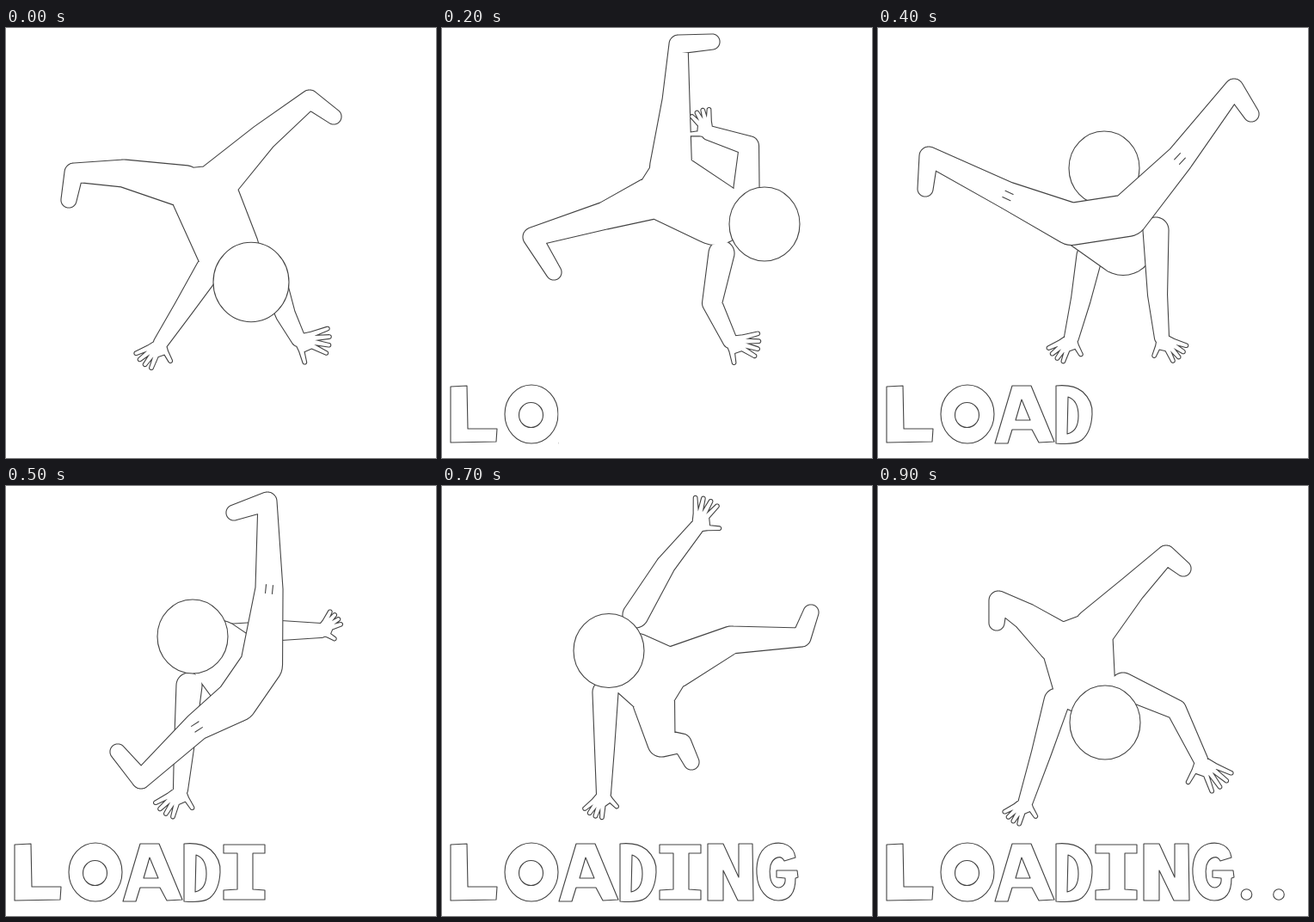
An HTML page that plays this animation: 500 px wide and 500 px high, repeating every 1000 ms.

```html
<!DOCTYPE html>
<html lang="en">
<head>
<meta charset="utf-8">
<title>Loading</title>
<style>
html, body { margin: 0; width: 100%; height: 100%; overflow: hidden; background: #fff; }
svg { display: block; width: 100vw; height: 100vh; }
.ink { fill: none; stroke: #444; stroke-width: 1.1; stroke-linecap: round; stroke-linejoin: round; }
.edge { stroke-width: 2.2; }
.skin { fill: #fff; stroke: none; }
.head { fill: #fff; }
.pose { visibility: hidden; animation: show 1s step-end infinite; animation-delay: calc(var(--i) * 100ms - 1000ms); }
.cover { fill: #fff; animation: reveal 1s step-end infinite; }
@keyframes show { 0% { visibility: visible; } 10%, 100% { visibility: hidden; } }
@keyframes reveal {
  0% { transform: translateX(0); }
  10% { transform: translateX(69px); }
  20% { transform: translateX(135.5px); }
  30% { transform: translateX(205.8px); }
  40% { transform: translateX(251px); }
  50% { transform: translateX(305px); }
  60% { transform: translateX(363.5px); }
  70% { transform: translateX(417px); }
  80% { transform: translateX(446px); }
  90%, 100% { transform: translateX(500px); }
}
</style>
</head>
<body>
<svg viewBox="0 0 500 500">
  <g class="ink">
    <path d="M10 417L29 416L30 466L64 466L63 481L10 482Z"/>
    <ellipse cx="104" cy="449" rx="31" ry="34"/>
    <ellipse cx="103.500" cy="450" rx="14" ry="14.500"/>
    <path d="M136 483L156 416L178 416L205 481L187 482L179 467L156 467L151 483ZM167 432L160 456L177 456Z"/>
    <path d="M207 416Q227 414 238 423Q250 434 249 449Q248 470 237 479Q229 485 207 483ZM221 429L220 472Q233 469 233 451Q233 433 221 429Z"/>
    <path d="M253 417H301V427H287V469L301 470V481H253V470L269 469V427H253Z"/>
    <path d="M309 416H327L345 455V416H361L362 482H344L327 447V482H309Z"/>
    <path d="M411 432C409 418 397 413 384 416C370 420 365 435 366 451C367 470 378 482 391 482C405 482 411 472 411 456L414 455L413 447H389V455L399 456C400 464 394 469 388 466C381 462 380 450 382 441C385 432 394 428 398 436Z"/>
    <circle cx="428.500" cy="475" r="6.300"/>
    <circle cx="466" cy="475" r="6.300"/>
  </g>
  <rect class="cover" y="405" width="500" height="90"/>
  <g id="dancer" class="ink"></g>
</svg>
<script>
// Key poses, one per beat of 100 ms. Legs: hip, knee, heel, toe.
// Arms: shoulder, elbow, wrist, fingertips. Beats left out are in-betweens.
// Layers run back to front; letters in one layer merge into one outline:
// t torso, p pelvis, l and r legs (capital: with knee marks), a and b arms, h head.
const keys = [
  { beat: 0, layers: "tlrab h", head: [285, 295.5, 44], chest: [258, 258],
    l: [[207, 184], [137, 169], [79, 168], [73, 200]],
    r: [[245, 180], [299, 127], [353, 83], [381, 103]],
    a: [[236, 280], [207, 325], [180, 366], [157, 390]],
    b: [[310, 290], [325, 333], [340, 362], [378, 364]] },
  { beat: 2, layers: "tlrab h", head: [375, 228, 41], chest: [318, 216],
    l: [[243, 198], [190, 218], [105, 243], [130, 284]],
    r: [[266, 162], [272, 85], [275, 19], [314, 16]],
    a: [[354, 186], [357, 137], [310, 122], [299, 95]],
    b: [[325, 262], [314, 320], [335, 364], [370, 369]] },
  { beat: 4, layers: "a t b h pLR", head: [263, 163, 41], chest: [285, 251],
    l: [[225, 228], [151, 195], [59, 149], [55, 187]],
    r: [[290, 218], [351, 152], [414, 70], [434, 100]],
    a: [[246, 265], [236, 315], [225, 360], [204, 383]],
    b: [[323, 235], [325, 310], [330, 360], [354, 381]] },
  { beat: 5, layers: "b ta pLR h", head: [217, 175, 41], chest: [245, 192],
    l: [[268, 250], [222, 280], [157, 341], [130, 309]],
    r: [[297, 208], [306, 120], [304, 18], [265, 31]],
    a: [[213, 232], [207, 305], [203, 353], [181, 380]],
    b: [[265, 175], [320, 168], [366, 168], [386, 151]] },
  { beat: 6, layers: "b tlaR h", head: [188, 167, 41], chest: [217, 205],
    l: [[305, 247], [359, 306], [428, 257], [449, 283]],
    r: [[292, 205], [264, 148], [263, 44], [241, 76]],
    a: [[193, 228], [191, 300], [190, 358], [172, 383]],
    b: [[240, 158], [285, 137], [325, 134], [357, 130]] },
  { beat: 7, layers: "tlrab h", head: [194, 191.5, 41], chest: [222, 207],
    l: [[246, 250], [255, 299], [279, 299], [290, 321]],
    r: [[270, 211], [336, 179], [418, 176], [429, 147]],
    a: [[190, 240], [189, 305], [188, 357], [174, 384]],
    b: [[225, 150], [260, 92], [296, 48], [309, 14]] },
  { beat: 9, layers: "tlrab h", head: [264, 275, 41], chest: [239, 228],
    l: [[209, 182], [172, 152], [140, 133], [138, 159]],
    r: [[252, 166], [295, 120], [335, 80], [355, 96]],
    a: [[208, 250], [190, 310], [172, 366], [153, 389]],
    b: [[285, 232], [347, 260], [375, 318], [403, 348]] }
];

const LEG = [24, 15.5, 10.5, 8.5], ARM = [14.5, 11, 8];
const range = n => [...Array(n).keys()];
const mean = (a, b) => a.map((v, i) => (v + b[i]) / 2);
const polar = (p, q) => ({ angle: Math.atan2(q[1] - p[1], q[0] - p[0]), len: Math.hypot(q[0] - p[0], q[1] - p[1]) });
const step = (p, angle, len) => [p[0] + Math.cos(angle) * len, p[1] + Math.sin(angle) * len];
const disc = (p, r) => [p[0], p[1], r];

// Outline of the convex hull around a few discs.
function hull(discs) {
  const pts = discs.flatMap(([x, y, r]) => range(36).map(i => step([x, y], i * Math.PI / 18, r)));
  pts.sort((a, b) => a[0] - b[0] || a[1] - b[1]);
  const half = list => {
    const out = [];
    for (const p of list) {
      for (;;) {
        const [a, b] = out.slice(-2);
        if (!b || (b[0] - a[0]) * (p[1] - a[1]) - (b[1] - a[1]) * (p[0] - a[0]) > 0) break;
        out.pop();
      }
      out.push(p);
    }
    return out.slice(0, -1);
  };
  const ring = [...half(pts), ...half(pts.reverse())];
  return "M" + ring.map(p => p.map(v => v.toFixed(1)).join(" ")).join("L") + "Z";
}

const limb = (joints, radii) => radii.slice(1).map((r, i) =>
  hull([disc(joints[i], radii[i]), disc(joints[i + 1], r)])).join("");

// Four fanned fingers and a thumb, which lies on the given side.
function hand(wrist, tip, side) {
  const { angle, len } = polar(wrist, tip);
  const fan = range(4).map(i => ({ turn: (i - 1.5) * 0.27, reach: len }));
  fan.push({ turn: side * 1.25, reach: len * 0.78 });
  const knuckles = fan.map(f => disc(step(wrist, angle + f.turn, f.reach * 0.45), 2.6));
  const fingers = fan.map((f, i) => hull([knuckles[i], disc(step(wrist, angle + f.turn, f.reach - 2), 1.8)]));
  return hull([disc(wrist, 5), ...knuckles]) + fingers.join("");
}

const parts = {
  t: p => hull([disc(p.chest, 36), disc(p.l[0], 20), disc(p.r[0], 20)]),
  p: p => hull([disc(p.l[0], LEG[0]), disc(p.r[0], LEG[0])]),
  l: p => limb(p.l, LEG),
  r: p => limb(p.r, LEG),
  a: p => limb(p.a, ARM) + hand(p.a[2], p.a[3], -1),
  b: p => limb(p.b, ARM) + hand(p.b[2], p.b[3], 1)
};

function kneeMarks([hip, knee]) {
  const { angle } = polar(hip, knee);
  const marks = [-4, 4].map(off => {
    const mid = step(knee, angle + Math.PI / 2, off);
    return "M" + step(mid, angle, -5) + "L" + step(mid, angle, 5);
  });
  return `<path d="${marks.join("")}"/>`;
}

function drawLayer(pose, layer) {
  if (layer === "h") {
    const [x, y, r] = pose.head;
    return `<ellipse class="head" cx="${x}" cy="${y}" rx="${r}" ry="${r * 1.05}"/>`;
  }
  const d = [...layer].map(c => parts[c.toLowerCase()](pose)).join("");
  const marks = [...layer].filter(c => c < "a").map(c => kneeMarks(pose[c.toLowerCase()]));
  return `<path class="edge" d="${d}"/><path class="skin" d="${d}"/>` + marks.join("");
}

// Halfway between two chains of joints: every bone turns the short way.
function swing(from, to) {
  const out = [mean(from[0], to[0])];
  for (let i = 1; i < from.length; i++) {
    const a = polar(from[i - 1], from[i]), b = polar(to[i - 1], to[i]);
    const turn = Math.atan2(Math.sin(b.angle - a.angle), Math.cos(b.angle - a.angle));
    out.push(step(out[i - 1], a.angle + turn / 2, (a.len + b.len) / 2));
  }
  return out;
}

function poseAt(beat) {
  const next = keys.find(k => k.beat >= beat);
  if (next.beat === beat) return next;
  const prev = keys[keys.indexOf(next) - 1];
  const pose = { layers: next.layers, head: mean(prev.head, next.head), chest: mean(prev.chest, next.chest) };
  for (const c of "lrab") pose[c] = swing(prev[c], next[c]);
  return pose;
}

document.getElementById("dancer").innerHTML = range(10).map(i => {
  const pose = poseAt(i);
  const art = pose.layers.split(" ").map(layer => drawLayer(pose, layer)).join("");
  return `<g class="pose" style="--i:${i}">${art}</g>`;
}).join("");
</script>
</body>
</html>
```
